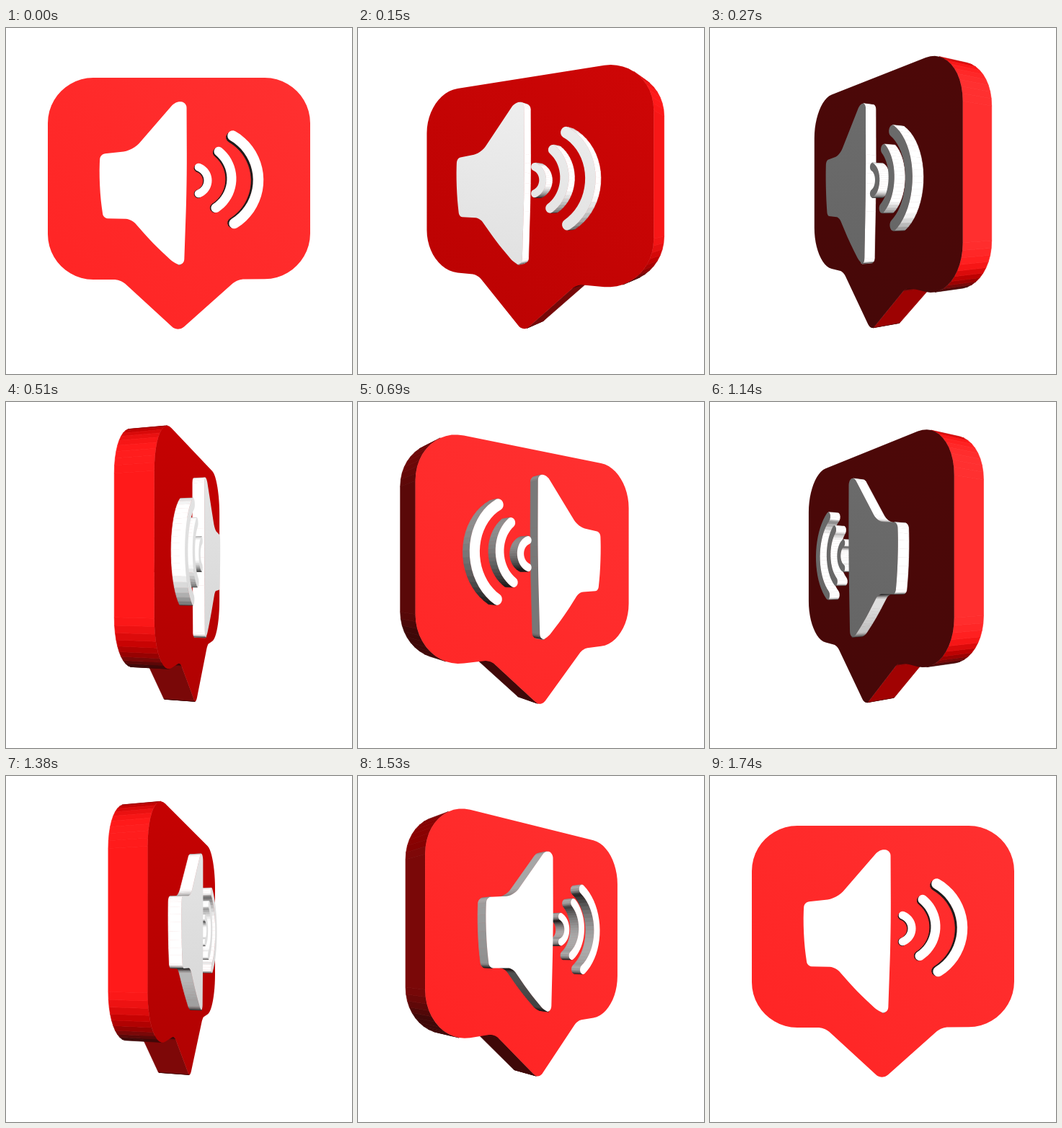
An HTML page with a canvas for the animation above (1770 ms loop, 480 by 480 pixels).

```html
<!DOCTYPE html>
<html lang="en">
<head>
<meta charset="utf-8">
<title>Rotating sound bubble</title>
<style>
  html, body { margin: 0; width: 100%; height: 100%; overflow: hidden; background: #fff; }
  canvas { display: block; width: 480px; height: 480px; }
</style>
</head>
<body>
<canvas id="stage" width="480" height="480"></canvas>
<script>
const ctx = document.getElementById('stage').getContext('2d');
const MID = 240, CAMERA = 657, PIVOT = 2;
const STEP = 30, LOOP = 1770, TURN = 58;
const FRONT = 17.5, BACK = -26, RAISE = 16;
const LIGHT = [0.35, -0.2, 0.93];

// Polygon of [x, y, r] with each corner rounded over the length r.
function rounded(corners, steps = 12) {
  const out = [], n = corners.length, k = 0.55;
  const toward = (v, w, r) => {
    const d = Math.hypot(w[0] - v[0], w[1] - v[1]);
    return [v[0] + (w[0] - v[0]) * r / d, v[1] + (w[1] - v[1]) * r / d];
  };
  corners.forEach((v, i) => {
    const r = v[2];
    const a = toward(v, corners[(i + n - 1) % n], r);
    const b = toward(v, corners[(i + 1) % n], r);
    for (let j = 0; j <= steps; j++) {
      const t = j / steps, u = 1 - t;
      out.push([0, 1].map(c => {
        const ha = a[c] + k * (v[c] - a[c]), hb = b[c] + k * (v[c] - b[c]);
        return u * u * u * a[c] + 3 * u * u * t * ha + 3 * u * t * t * hb + t * t * t * b[c];
      }));
    }
  });
  return out;
}

// Thick arc with round ends; angles in degrees.
function wave(cx, cy, radius, from, to, width) {
  const out = [], h = width / 2, rad = Math.PI / 180;
  const arc = (x, y, r, a, b, n) => {
    for (let i = 0; i <= n; i++) {
      const t = (a + (b - a) * i / n) * rad;
      out.push([x + r * Math.cos(t), y + r * Math.sin(t)]);
    }
  };
  const cap = a => arc(cx + radius * Math.cos(a * rad), cy + radius * Math.sin(a * rad),
    h, a + (a === to ? 0 : 180), a + (a === to ? 180 : 360), 8);
  arc(cx, cy, radius + h, from, to, 20);
  cap(to);
  arc(cx, cy, radius - h, to, from, 20);
  cap(from);
  return out;
}

// Turn stage pixels of the front view into model units at depth z.
const toModel = (points, z) => points.map(p => p.map(c => (c - MID) * (CAMERA - z) / CAMERA));

const bubble = toModel(rounded([
  [58, 69, 63], [422, 69, 63], [422, 348, 63], [321, 348.5, 9],
  [238.5, 422, 11], [159, 349, 9], [58, 349, 63]
]), FRONT);

const icon = [
  rounded([
    [130.5, 175, 7], [176, 170, 13], [235, 102, 7], [250.5, 102.5, 8], [251, 215, 40],
    [247, 330, 9], [234, 327, 8], [204, 299, 18], [174, 265, 8], [135, 264, 6], [128.5, 218, 30]
  ], 6),
  wave(260.5, 211.5, 19.5, -70, 70, 11),
  wave(264.5, 209, 48.5, -51, 57, 13),
  wave(279, 211, 71, -60, 58, 14.5)
].map(p => toModel(p, FRONT + RAISE));

const backIcon = icon.map(part => part.map(([x, y]) => [x + 6, y]));
const meanX = part => part.reduce((sum, p) => sum + p[0], 0) / part.length;

function red(v) {
  v = Math.max(0.2, v);
  const r = Math.min(255, 319 * v), g = Math.max(v < 0.4 ? 8 : 2, Math.min(48, (v - 0.6) * 130));
  return `rgb(${r | 0},${g | 0},${g | 0})`;
}

function white(v) {
  const g = Math.min(255, 255 * (0.11 + 1.29 * Math.max(0, v))) | 0;
  return `rgb(${g},${g},${g})`;
}

let cos = 1, sin = 0;

const place = (x, y, z) => [
  -PIVOT + (x + PIVOT) * cos - z * sin, y, (x + PIVOT) * sin + z * cos
];
const project = ([x, y, z]) => {
  const s = CAMERA / (CAMERA - z);
  return [MID + x * s, MID + y * s];
};
const dot = (a, b) => a[0] * b[0] + a[1] * b[1] + a[2] * b[2];
const faces = (n, p) => dot(n, [-p[0], -p[1], CAMERA - p[2]]) > 0;

function fill(points, style, seam) {
  ctx.beginPath();
  points.map(project).forEach(p => ctx.lineTo(p[0], p[1]));
  ctx.closePath();
  ctx.fillStyle = style;
  ctx.fill();
  if (seam) {
    ctx.strokeStyle = style;
    ctx.lineWidth = 0.7;
    ctx.stroke();
  }
}

// Slightly brighter toward the upper right.
function sheen(points, colour, v) {
  const xs = points.map(p => project(p)[0]);
  const g = ctx.createLinearGradient(Math.min(...xs), 400, Math.max(...xs), 70);
  g.addColorStop(0, colour(v * 0.95));
  g.addColorStop(1, colour(v * 1.05));
  return g;
}

function capNormal(side) {
  return [-sin * side, 0, cos * side];
}

function prism(shape, low, high, colour) {
  const near = shape.map(p => place(p[0], p[1], high));
  const far = shape.map(p => place(p[0], p[1], low));
  const walls = [];
  shape.forEach((p, i) => {
    const j = (i + 1) % shape.length, q = shape[j];
    const dx = q[0] - p[0], dy = q[1] - p[1], len = Math.hypot(dx, dy);
    if (len < 0.01) return;
    const n = [dy / len * cos, -dx / len, dy / len * sin];
    if (faces(n, near[i])) {
      walls.push({
        points: [near[i], near[j], far[j], far[i]],
        z: near[i][2] + near[j][2] + far[i][2] + far[j][2],
        shade: dot(n, LIGHT)
      });
    }
  });
  walls.sort((a, b) => a.z - b.z).forEach(w => fill(w.points, colour(w.shade), true));
  [[near, 1], [far, -1]].forEach(([points, side]) => {
    const n = capNormal(side);
    if (faces(n, points[0])) fill(points, sheen(points, colour, dot(n, LIGHT)));
  });
}

function drawIcon(side) {
  const parts = side > 0 ? icon : backIcon;
  const [low, high] = side > 0 ? [FRONT, FRONT + RAISE] : [BACK - RAISE, BACK];
  [...parts].sort((a, b) => (meanX(a) - meanX(b)) * sin)
    .forEach(part => prism(part, low, high, white));
}

function draw(angle) {
  cos = Math.cos(angle);
  sin = Math.sin(angle);
  ctx.fillStyle = '#fff';
  ctx.fillRect(0, 0, 480, 480);
  const visible = side => faces(capNormal(side), place(0, 0, side > 0 ? FRONT : BACK));
  const sides = [1, -1];
  sides.filter(s => !visible(s)).forEach(drawIcon);
  prism(bubble, BACK, FRONT, red);
  sides.filter(visible).forEach(drawIcon);
}

function tick() {
  const step = Math.floor(performance.now() % LOOP / STEP);
  draw(step / TURN * 2 * Math.PI);
  requestAnimationFrame(tick);
}
tick();
</script>
</body>
</html>
```
